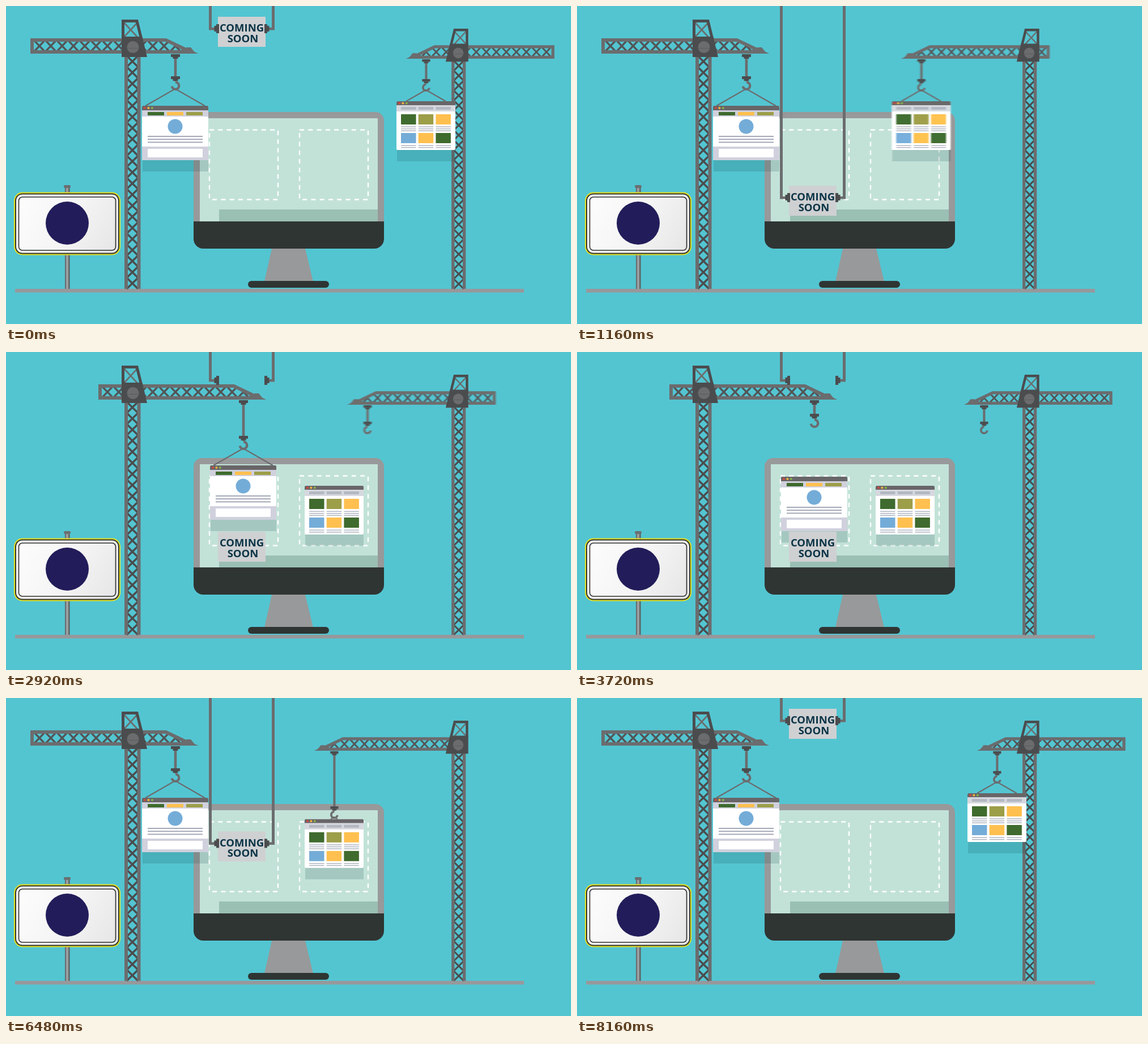
Write an HTML page with a canvas that moves like this. It is 997x561 px and loops after 8200 ms.

```html
<!DOCTYPE html>
<html lang="en">
<head>
<meta charset="utf-8">
<title>Coming soon</title>
<style>
html, body { margin: 0; width: 100%; height: 100%; overflow: hidden; background: #53c5d1; }
canvas { display: block; }
</style>
</head>
<body>
<canvas id="stage" width="997" height="561"></canvas>
<script>
const W = 997, H = 561, LOOP = 8200, STEP = 40, GROUND = 499;
const STEEL = '#6b6c6e', DARK = '#4b4c4e', SLATE = '#2f3533', GREY = '#98999a';
const GREEN = '#3f6b2e', YELLOW = '#ffc04f', OLIVE = '#9d9e48', BLUE = '#74acd8';

const stage = document.getElementById('stage').getContext('2d');
const layer = makeLayer(), blend = makeLayer();
let g = stage;

function makeLayer() {
  const c = document.createElement('canvas');
  c.width = W;
  c.height = H;
  return c.getContext('2d');
}

// ---- motion ----

// Short acceleration, steady run, longer braking.
function ease(u) {
  const a = 0.13, b = 0.34, v = 1 / (1 - (a + b) / 2);
  if (u <= 0) return 0;
  if (u >= 1) return 1;
  if (u < a) return v * u * u / (2 * a);
  if (u > 1 - b) return 1 - v * (1 - u) ** 2 / (2 * b);
  return v * (u - a / 2);
}

const go = (t, start, span) => ease((t - start) / span);

const left = {
  x: 224, y: 24, scale: 1, flip: 1, jibOffset: 0,
  card: pageCard, cardWidth: 117, cardX: 240, cardY: 176, hookY: 149,
  drop: 44, slack: 15, sag: 37, hookLift: 25, cardLift: 24,
  travel: t => 120 * (go(t, 1975, 555) - go(t, 5500, 810)),
  phases: t => ({
    lower: go(t, 2530, 810), clear: go(t, 3360, 360), reach: go(t, 4100, 470),
    lift: go(t, 4700, 670), home: go(t, 5500, 810)
  })
};

const right = {
  x: 798, y: 40, scale: 0.884, flip: -1, jibOffset: -11,
  card: galleryCard, cardWidth: 104, cardX: 689, cardY: 168, hookY: 151,
  drop: 68, slack: 6, sag: 27, hookLift: 17, cardLift: 8,
  travel: t => 162 * (go(t, 6970, 1195) - go(t, 280, 1260))
    + 139 * (go(t, 2490, 1110) - go(t, 4700, 690)),
  phases: t => ({
    lower: go(t, 1710, 700), clear: go(t, 2420, 440), reach: go(t, 5500, 810),
    lift: go(t, 6330, 520), home: go(t, 6970, 1195)
  })
};

// Set the card down, leave it, come back, pick it up and carry it home.
function pose(c, t) {
  const { lower, clear, reach, lift, home } = c.phases(t);
  return {
    shift: c.travel(t),
    parked: clear > 0 && lift === 0,
    cardY: c.cardY + c.drop * (lower - lift) - c.cardLift * (lift - home),
    hookY: c.hookY + c.drop * (lower - clear) - c.slack * (clear - reach)
      + (c.drop + c.sag) * (reach - lift) - c.hookLift * (lift - home)
  };
}

function noticePose(t) {
  const down = go(t, 0, 1100), away = go(t, 1540, 600);
  const back = go(t, 5500, 800), up = go(t, 6340, 510);
  return {
    arms: 40 + 298 * (down - up) - 288 * (away - back),
    board: 40 + 298 * (down - up)
  };
}

// ---- drawing helpers ----

const times = (n, draw) => { for (let i = 0; i < n; i++) draw(i); };

function rect(x, y, w, h, fill) {
  g.fillStyle = fill;
  g.fillRect(x, y, w, h);
}

function round(x, y, w, h, r, fill) {
  g.fillStyle = fill;
  g.beginPath();
  g.roundRect(x, y, w, h, r);
  g.fill();
}

function disc(x, y, r, fill) {
  g.fillStyle = fill;
  g.beginPath();
  g.arc(x, y, r, 0, Math.PI * 2);
  g.fill();
}

function trace(points, close) {
  g.beginPath();
  points.forEach(([x, y]) => g.lineTo(x, y));
  if (close) g.closePath();
}

function line(points, width, color, close) {
  trace(points, close);
  g.lineWidth = width;
  g.strokeStyle = color;
  g.stroke();
}

// Four-sided shape with level top and bottom edges.
function trapezoid(y, x1, x2, base, x3, x4, fill) {
  trace([[x1, y], [x2, y], [x4, base], [x3, base]], true);
  g.fillStyle = fill;
  g.fill();
}

function cross(x, y, w, h, width, color) {
  line([[x, y], [x + w, y + h]], width, color);
  line([[x + w, y], [x, y + h]], width, color);
}

function fade(x1, y1, x2, y2, ...colors) {
  const f = g.createLinearGradient(x1, y1, x2, y2);
  colors.forEach((c, i) => f.addColorStop(i / (colors.length - 1), c));
  return f;
}

function mirrored(axis, draw) {
  g.save();
  g.translate(axis * 2, 0);
  g.scale(-1, 1);
  draw();
  g.restore();
}

// ---- scenery ----

function monitor() {
  round(331, 187, 336, 220, 15, GREY);
  rect(342, 198, 314, 183, '#c2e2d8');
  rect(376, 359, 280, 22, '#9abfb3');
  round(331, 380, 336, 48, [0, 0, 17, 17], SLATE);
  trapezoid(428, 469, 528, 486, 456, 542, GREY);
  round(427, 485, 143, 12, 6, SLATE);
  g.setLineDash([8, 7.3]);
  g.strokeStyle = '#fff';
  g.lineWidth = 2.4;
  for (const x of [359, 518]) g.strokeRect(x, 218.5, 121, 123);
  g.setLineDash([]);
}

function roadSign() {
  rect(104, 318, 8.5, GROUND - 318, fade(104, 0, 112, 0, '#555a5d', '#adb0b1', '#4f5456'));
  round(102, 316, 12, 5, 2, '#6a6f71');
  const panel = (inset, fill) =>
    round(14 + inset, 328.5 + inset, 188 - inset * 2, 111 - inset * 2, 15 - inset, fill);
  panel(0, '#e6e01f');
  panel(2, '#33342c');
  panel(4, fade(18, 332, 198, 436, '#fdfdfd', '#f5f5f5', '#e5e5e5'));
  panel(7.7, '#2c2c2c');
  panel(9.3, fade(18, 332, 198, 436, '#fdfdfd', '#f5f5f5', '#e5e5e5'));
  disc(108, 383, 38, '#221d5a');
}

// ---- cards ----

function cardFrame(x, y, w, h, bar, strip, stripColor) {
  rect(x + 1, y + h - 1, w - 1, 21, 'rgba(20,75,75,.17)');
  round(x, y, w, h, 2, '#fff');
  round(x, y, w, bar, [2, 2, 0, 0], '#686568');
  rect(x, y + bar, w, strip, stripColor);
  ['#d2453c', '#f2b33d', '#86b548'].forEach((c, i) => disc(x + 5 + i * 6.4, y + bar / 2, 2, c));
}

function pageCard(x, y) {
  cardFrame(x, y, 117, 96, 8, 11, '#d0d1dd');
  [GREEN, YELLOW, OLIVE].forEach((c, i) => rect(x + 10 + i * 34, y + 11, 29, 6, c));
  disc(x + 58.5, y + 36.5, 13, BLUE);
  times(3, i => rect(x + 10, y + 53 + i * 5.2, 97, 2, '#a3a9b7'));
  round(x, y + 72, 117, 24, [0, 0, 2, 2], '#d0d1dd');
  rect(x + 10, y + 76, 97, 15, '#fff');
}

function galleryCard(x, y) {
  cardFrame(x, y, 104, 86, 7, 11, '#d6d8df');
  [GREEN, OLIVE, YELLOW, BLUE, YELLOW, GREEN].forEach((c, i) => {
    const row = Math.floor(i / 3), px = x + 8 + (i % 3) * 30.7, py = y + 23 + row * 33;
    if (!row) rect(px, y + 10, 26.5, 5, '#b3b8c1');
    rect(px, py, 26.5, 18, c);
    times(3 - row, k => rect(px, py + 21.5 + k * 3.5, 26.5, 1.4, '#a9afbb'));
  });
}

// ---- cranes ----

// Both cranes share one set of coordinates around the cab; the right one is mirrored and smaller.
function inCrane(c, draw) {
  g.save();
  g.translate(c.x, c.y);
  g.scale(c.scale * c.flip, c.scale);
  draw();
  g.restore();
}

function mast(c) {
  inCrane(c, () => {
    const top = 64, foot = (GROUND - c.y) / c.scale, count = Math.round((foot - top) / 20);
    const pitch = (foot - top) / count;
    times(count, i => cross(-11, top + i * pitch, 20, pitch, 3.5, DARK));
    for (const x of [-15, 7.5]) rect(x, top, 6, foot - top, STEEL);
  });
}

function cab(c) {
  inCrane(c, () => {
    cross(-16, 5, 24, 26, 2.6, STEEL);
    line([[-17.5, 33], [-17.5, 2.5], [7, 2.5], [14.5, 33]], 5, DARK);
    trapezoid(30, -20, 16.5, 66, -20, 25, DARK);
    disc(0, 48.5, 10.5, STEEL);
    rect(-9.5, 50, 19, 1, '#5a5b5d');
  });
}

function jib(c, shift, hookY) {
  inCrane(c, () => {
    g.translate(c.jibOffset + shift * c.flip / c.scale, 0);
    const tail = -178, bend = 58, tip = 102, top = 36, base = 57;
    const frame = [[tail, top], [bend, top], [tip, base], [tail, base]];
    g.save();
    trace(frame, true);
    g.clip();
    times(14, i => cross(tail + 3 + i * 20, top, 20, base - top, 3.3, '#535456'));
    g.restore();
    line(frame, 6, STEEL, true);
    trapezoid(49, tip - 8, tip, base + 3, tip - 8, tip + 9, STEEL);

    g.translate(75, 0);
    const low = (hookY - c.y) / c.scale;
    const clamp = y => {
      rect(-8, y, 16, 5, DARK);
      rect(-4.5, y + 5, 9, 3, DARK);
    };
    rect(-2.3, base + 4, 4.6, low - base - 20, STEEL);
    clamp(base + 4);
    clamp(low - 25);
    g.beginPath();
    g.arc(0, low - 8.3, 6.3, -Math.PI / 2, Math.PI * 0.95);
    g.lineWidth = 4.2;
    g.strokeStyle = STEEL;
    g.stroke();
  });
}

function slings(x, top, cardY) {
  const half = (cardY - top) * 1.74;
  if (half > 0) line([[x - half, cardY], [x, top], [x + half, cardY]], 2.2, STEEL);
}

// Averages shifted copies of a moving group along its travel.
function smear(distance, draw) {
  if (Math.abs(distance) < 0.4) return draw();
  const copies = 5;
  layer.clearRect(0, 0, W, H);
  blend.clearRect(0, 0, W, H);
  g = layer;
  draw();
  g = stage;
  blend.globalCompositeOperation = 'lighter';
  blend.globalAlpha = 1 / copies;
  times(copies, i => blend.drawImage(layer.canvas, distance * (i / (copies - 1) - 0.5), 0));
  stage.drawImage(blend.canvas, 0, 0);
}

function crane(c, t) {
  const { shift, parked, cardY, hookY } = pose(c, t);
  const reach = c.travel(LOOP / 2 - 1500);
  mast(c);
  if (parked) c.card(c.cardX + parkedShift(c), cardY);
  smear(c.travel(t + 10) - c.travel(t - 10), () => {
    if (!parked) {
      const x = c.cardX + shift;
      slings(x + c.cardWidth / 2, hookY - 3, cardY);
      c.card(x, cardY);
    }
    jib(c, shift, hookY);
  });
  cab(c);
}

// The card stays where the crane stood while lowering it.
function parkedShift(c) {
  let t = 0;
  while (c.phases(t).lower < 1) t += STEP;
  return c.travel(t);
}

// ---- hanging notice ----

function notice(y) {
  rect(374, y - 21, 84, 53, '#cfd0d2');
  g.fillStyle = '#0b3446';
  g.font = 'bold 18.5px "Open Sans", "Noto Sans", sans-serif';
  g.textAlign = 'center';
  g.fillText('COMING', 416, y + 5.3);
  g.fillText('SOON', 418, y + 24);
}

function arm(y) {
  rect(358, 0, 5, y + 2, STEEL);
  rect(358, y - 2, 11, 4.5, STEEL);
  rect(367.5, y - 5, 4, 10, DARK);
  rect(371, y - 8, 5, 16, DARK);
}

function render(t) {
  const { arms, board } = noticePose(t);
  rect(0, 0, W, H, '#53c5d1');
  monitor();
  rect(16, GROUND, 898, 6.5, '#97989b');
  roadSign();
  crane(right, t);
  crane(left, t);
  notice(board);
  arm(arms);
  mirrored(416, () => arm(arms));
}

function tick() {
  const t = performance.now() % LOOP;
  render(Math.floor(t / STEP) * STEP);
  requestAnimationFrame(tick);
}
tick();
</script>
</body>
</html>
```
